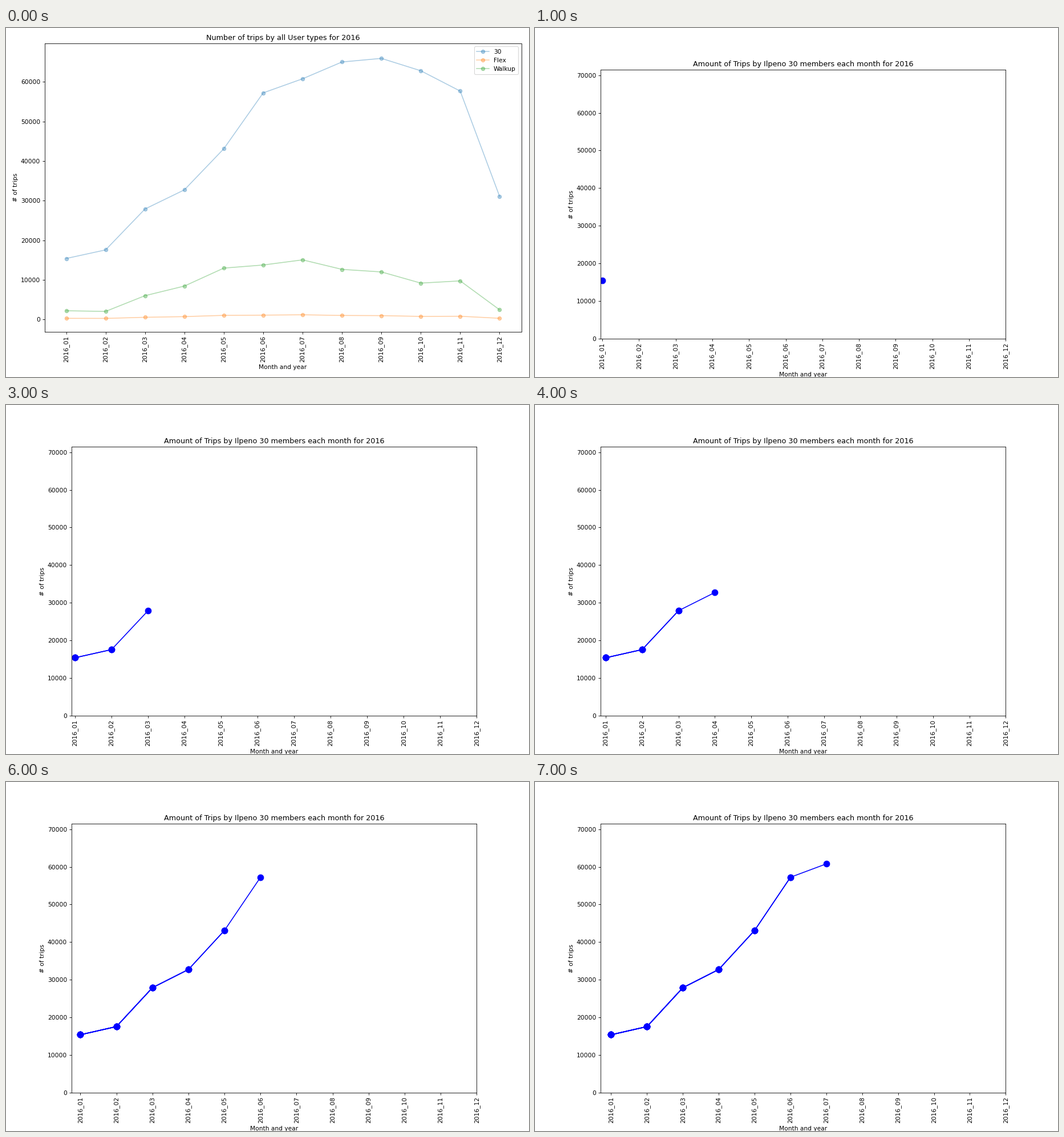
A matplotlib script for the animation above (8000 ms loop, 917x611 px).

```python
import numpy as np
import matplotlib.pyplot as plt
from matplotlib.animation import FuncAnimation

W, H = 917, 611
DPI = H / 8
STEPS = 8
MONTH = np.arange(12)


def ease(*keys):
    """Monthly values on half-cosine curves through (month, value) keys."""
    xs, ys = zip(*keys)
    index = range(len(keys))
    part, t = np.divmod(np.interp(MONTH, xs, index), 1)
    return np.interp(part + (1 - np.cos(np.pi * t)) / 2, index, ys)


def ripple(period):
    return np.cos(2 * np.pi * (MONTH - 2) / period)


# Members ripple only while rising; walk-ups alternate all year.
members = ease((0, 16780), (7.5, 67000), (9, 62830), (10, 57690), (11, 31050))
members += 2800 * ripple(3) * (MONTH < 8)
walkups = ease((0, 1570), (5.5, 14600), (10, 9120), (11, 3010))
walkups += 600 * ripple(2)
flex = 100 + 0.07 * walkups

fig = plt.figure(figsize=(W / DPI, H / DPI), dpi=DPI, facecolor="white")


def label_axes(ax, title):
    ax.set_title(title)
    ax.set_xlabel("Month and year")
    ax.set_ylabel("# of trips")
    ax.set_xticks(MONTH, [f"2016_{m + 1:02d}" for m in MONTH], rotation=90)


def make_overview():
    left, right, top, bottom = 67.5, 903.5, 27, 531.5
    ax = fig.add_axes([left / W, 1 - bottom / H,
                       (right - left) / W, (bottom - top) / H])
    for name, trips in (("30", members), ("Flex", flex), ("Walkup", walkups)):
        ax.plot(MONTH, trips, "-o", alpha=0.37, label=name)
    label_axes(ax, "Number of trips by all User types for 2016")
    ax.set_ylim(-3095, 69740)
    ax.legend(loc="upper right")
    return ax


def make_growth():
    ax = fig.add_subplot()
    # Every step redraws the whole path so far, which thickens older segments.
    paths = [ax.plot(MONTH[:n], members[:n], "-o", color="blue",
                     markersize=10)[0] for n in range(1, STEPS)]
    label_axes(ax, "Amount of Trips by Ilpeno 30 members each month for 2016")
    ax.set_ylim(0, 71430)
    return ax, paths


overview = make_overview()
growth, paths = make_growth()


def draw(step):
    overview.set_visible(step == 0)
    growth.set_visible(step > 0)
    for n, path in enumerate(paths, 1):
        path.set_visible(n <= step)
    # The left margin is 5% of the months shown; a lone point gets a fixed one.
    margin = 0.05 * (step - 1) if step > 1 else 0.055
    growth.set_xlim(-margin, 11)
    return [overview, growth]


anim = FuncAnimation(fig, draw, frames=STEPS, interval=1000,
                     repeat=True, blit=False)
plt.show()
```
